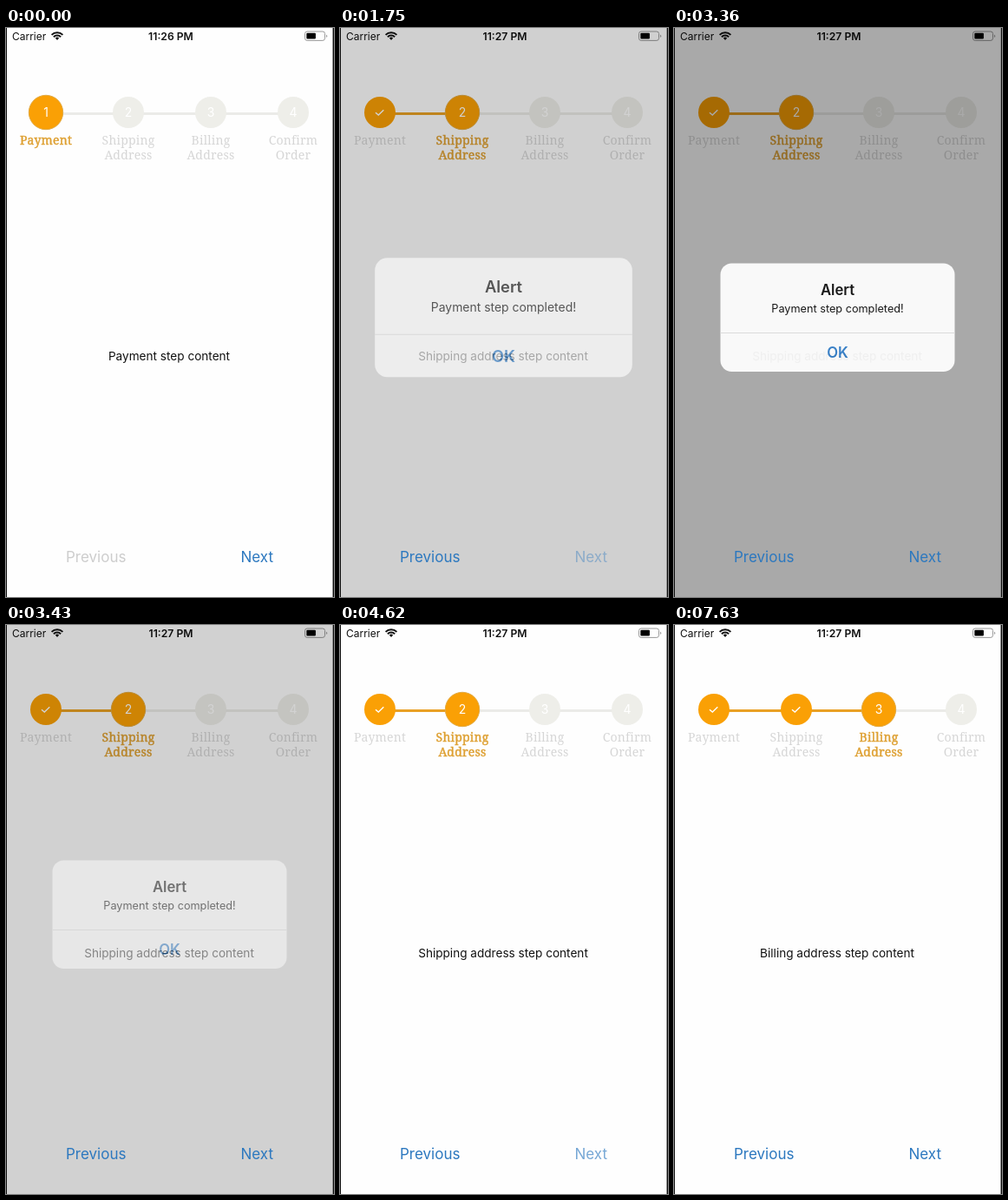
These frames come from a looping animation (378 px wide and 654 px high, 8 s). An HTML page:

```html
<!DOCTYPE html>
<html lang="en">
<head>
<meta charset="utf-8">
<title>Checkout steps</title>
<style>
  html, body { margin: 0; width: 100%; height: 100%; overflow: hidden; background: #fefefe; }
  svg { display: block; width: 378px; height: 654px; }
  text { font-family: Inter, Roboto, sans-serif; }
  .mid { text-anchor: middle; }
  .bold { font-weight: 600; }
  .status { font-size: 12.2px; fill: #111; }
  .label { font: 14px "Noto Serif", serif; letter-spacing: .2px; fill: #d6d6d6; }
  .label.active { fill: #dea032; stroke: #dea032; stroke-width: .45px; }
  .disc { fill: #eeeee9; }
  .disc.on { fill: #faa005; }
  .disc.active { stroke: #e2aa43; stroke-width: 1px; }
  .bar { fill: #ebebe8; }
  .bar.on { fill: #e9a125; }
  .digit { font-size: 14px; fill: #fff; }
  .check { fill: none; stroke: #fff; stroke-width: 1.4; }
  .body { font-size: 13.6px; fill: #111; }
  .button { font-size: 17px; fill: #2c78bf; }
  .button.off { fill: #cdcdcd; }
</style>
</head>
<body>
<svg id="stage" viewBox="0 0 378 654">
  <rect width="378" height="654" fill="#fefefe"/>
  <g id="statusBar">
    <text class="status" x="7" y="13.7" style="font-size:12px">Carrier</text>
    <g fill="none" stroke="#111" stroke-width="2">
      <path d="M52.6 7.9a9 9 0 0 1 12.8 0M54.9 10.3a5.8 5.8 0 0 1 8.2 0"/>
      <path d="M59 13.9l-2.2-2.3a3.1 3.1 0 0 1 4.4 0z" fill="#111" stroke="none"/>
    </g>
    <text id="clock" class="status mid bold" x="190" y="13.8"></text>
    <rect x="344.5" y="4" width="23" height="10.4" rx="2.6" fill="none" stroke="#999"/>
    <rect x="346.3" y="5.8" width="10.6" height="6.8" rx="1" fill="#000"/>
    <path d="M369 7.4a2 2 0 0 1 0 3.6z" fill="#999"/>
  </g>
  <g id="steps"></g>
  <text id="content" class="body mid" x="188" y="382"></text>
  <rect id="shade" width="378" height="654"/>
  <text id="back" class="button" x="69" y="614">Previous</text>
  <text id="next" class="button" x="308" y="614" text-anchor="end"></text>
  <g id="alert">
    <rect x="53.5" y="270.5" width="270" height="124.5" rx="13" fill="#fefefe"/>
    <path d="M53.5 350.5h270" stroke="#dedede"/>
    <text class="mid bold" x="188.5" y="306.5" font-size="16.7" fill="#111">Alert</text>
    <text class="mid" x="188.5" y="326.5" font-size="12.7" fill="#111">Payment step completed!</text>
    <text class="mid bold" x="188.5" y="379" font-size="16.7" fill="#347fc9">OK</text>
  </g>
  <rect width="1" height="654" fill="#111"/>
  <rect x="376" width="1" height="654" fill="#8c8c8c"/>
  <rect x="377" width="1" height="654" fill="#111"/>
</svg>
<script>
const LOOP = 8000;
const CLOCK_TICK = 1600;
const ALERT_IN = 1660, ALERT_OUT = 3340;

const STEPS = [
  { label: ['Payment'], content: 'Payment step content' },
  { label: ['Shipping', 'Address'], content: 'Shipping address step content' },
  { label: ['Billing', 'Address'], content: 'Billing address step content' },
  { label: ['Confirm', 'Order'], content: 'Confirm order step content' }
];

// Each tap dims its button, then moves to a step on release.
const TAPS = [
  { button: 'next', down: 1470, up: 1660, step: 1 },
  { button: 'next', down: 4550, up: 4850, step: 2 },
  { button: 'next', down: 5460, up: 5700, step: 3 },
  { button: 'back', down: 6790, up: 7090, step: 2 }
];

const byId = id => document.getElementById(id);
const clamp = v => Math.max(0, Math.min(1, v));
const easeInOut = p => p < .5 ? 2 * p * p : 1 - 2 * (1 - p) ** 2;
const ramp = (t, start, length) => easeInOut(clamp((t - start) / length));

// Critically damped spring from 0 to 1
function spring(ms) {
  const x = Math.max(0, ms) * .0187;
  return 1 - (1 + x) * Math.exp(-x);
}

function add(parent, tag, attrs, text = '') {
  const el = document.createElementNS('http://www.w3.org/2000/svg', tag);
  for (const key in attrs) el.setAttribute(key, attrs[key]);
  el.textContent = text;
  return parent.appendChild(el);
}

const root = byId('steps');
const stepX = i => 46 + 95 * i;
const bars = [0, 1, 2].map(i =>
  add(root, 'rect', { class: 'bar', x: stepX(i), y: 97, width: 95, height: 3 }));
const icons = STEPS.map(({ label }, i) => {
  const x = stepX(i);
  return {
    disc: add(root, 'circle', { class: 'disc', cx: x, cy: 97 }),
    digit: add(root, 'text', { class: 'digit mid', x, y: 102 }, i + 1),
    check: add(root, 'path', { class: 'check', d: `M${x - 5} 97.2l3.3 2.9 6-5.8` }),
    lines: label.map((word, row) =>
      add(root, 'text', { class: 'label mid', x, y: 134 + 16.5 * row }, word))
  };
});

function showStep(current) {
  bars.forEach((bar, i) => bar.classList.toggle('on', i < current));
  icons.forEach(({ disc, digit, check, lines }, i) => {
    const active = i === current, done = i < current;
    disc.setAttribute('r', active ? 19.7 : 18);
    disc.classList.toggle('on', active || done);
    disc.classList.toggle('active', active);
    digit.style.display = done ? 'none' : '';
    check.style.display = done ? '' : 'none';
    lines.forEach(line => line.classList.toggle('active', active));
  });
  byId('content').textContent = STEPS[current].content;
  byId('back').classList.toggle('off', current === 0);
  byId('next').textContent = current === STEPS.length - 1 ? 'Submit' : 'Next';
}

function buttonOpacity(name, t) {
  return TAPS.filter(tap => tap.button === name).reduce((opacity, { down, up }) =>
    opacity - .8 * (ramp(t, down, 150) - ramp(t, up, 250)), 1);
}

function showAlert(t) {
  const shown = spring(t - ALERT_IN);
  const visible = shown * (1 - spring(t - ALERT_OUT));
  const scale = 1.2 - .2 * shown;
  byId('shade').setAttribute('opacity', .357 * visible);
  byId('alert').setAttribute('opacity', t < ALERT_OUT ? Math.min(1, 1.25 * visible) : visible);
  byId('alert').setAttribute('transform',
    `translate(188.5 332.7) scale(${scale}) translate(-188.5 -332.7)`);
}

let shownStep = -1;
function render(t) {
  const step = TAPS.reduce((now, tap) => t >= tap.up ? tap.step : now, 0);
  if (step !== shownStep) showStep(shownStep = step);
  byId('clock').textContent = t < CLOCK_TICK ? '11:26 PM' : '11:27 PM';
  for (const name of ['back', 'next']) byId(name).setAttribute('opacity', buttonOpacity(name, t));
  showAlert(t);
}

const start = performance.now();
function tick() {
  render((performance.now() - start) % LOOP);
  requestAnimationFrame(tick);
}
tick();
</script>
</body>
</html>
```
